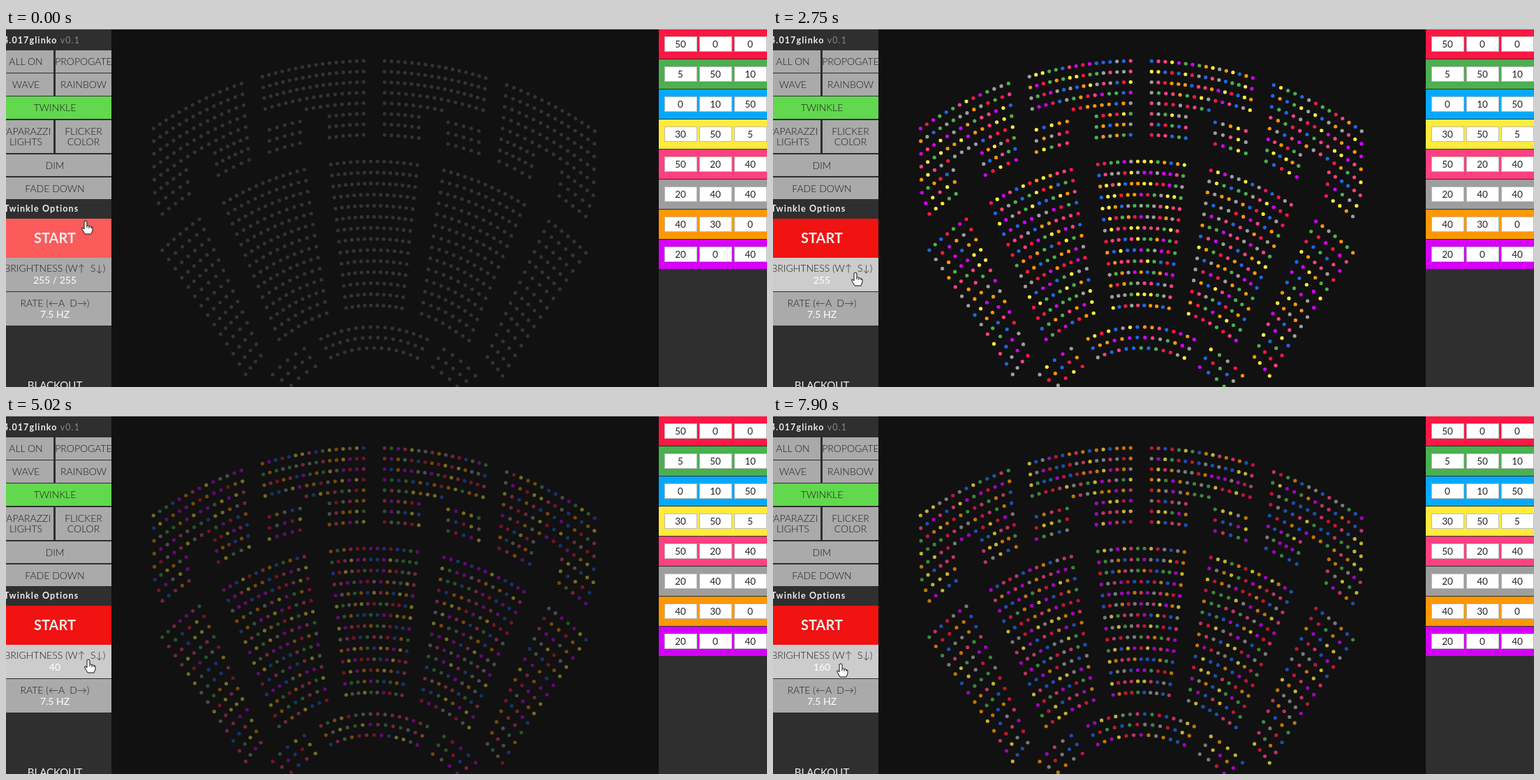
These frames come from a looping animation (1090x514 px, 8 s). An HTML page with a canvas:

```html
<!DOCTYPE html>
<html>
<head>
<meta charset="utf-8">
<style>
html, body { margin: 0; width: 100%; height: 100%; overflow: hidden; background: #2f2f2f; }
#stage { position: relative; width: 1090px; height: 514px; overflow: hidden; font: 300 14px/15px Lato, sans-serif; color: #1c1c1c; }
#stage > * { position: absolute; }
.box { display: flex; align-items: center; justify-content: center; text-align: center; white-space: pre; }
.tall { line-height: 16.5px; }
.tall span { color: #fff; font-weight: 400; }
.title { color: #eee; font-weight: 700; font-size: 12.5px; letter-spacing: 1.1px; justify-content: flex-start; }
.title span { color: #888; font-weight: 400; }
.start { font-size: 20px; font-weight: 700; color: #eee; }
.blackout { font-size: 15px; font-weight: 400; color: #eee; }
.field { box-sizing: border-box; border: 1px solid #bbb; font-weight: 400; font-size: 13.5px; color: #222; }
</style>
</head>
<body>
<div id="stage"><canvas id="seats" width="1090" height="514"></canvas></div>
<script>
const LOOP = 8000, LIGHTS_ON = 540, TICK = 133;
const stage = document.getElementById('stage');
const ctx = document.getElementById('seats').getContext('2d');
const mix = (a, b, k) => a + (b - a) * k;

function box(x, y, w, h, bg, html, cls = '') {
  const el = document.createElement('div');
  el.className = 'box ' + cls;
  el.style.cssText = `left:${x}px;top:${y}px;width:${w}px;height:${h}px;background:${bg}`;
  el.innerHTML = `<div>${html}</div>`;
  stage.append(el);
  return el;
}

// Left panel, running off the left edge
const GREY = '#aaa';
const wide = (y, h, html, cls, bg = GREY) => box(-11, y, 162, h, bg, html, cls);
const pair = (y, h, a, b) => { box(-11, y, 79, h, GREY, a); box(71, y, 80, h, GREY, b); };
box(-4, 8, 155, 18, 'none', '4.017glinko <span>v0.1</span>', 'title');
pair(32, 31.5, 'ALL ON', 'PROPOGATE');
pair(65, 31.5, 'WAVE', 'RAINBOW');
wide(98, 31.5, 'TWINKLE', '', '#62d84e');
pair(131.5, 47, 'PAPARAZZI\nLIGHTS', 'FLICKER\nCOLOR');
wide(180.5, 31.5, 'DIM');
wide(213.5, 31.5, 'FADE DOWN');
box(-3, 249, 154, 18, 'none', 'Twinkle Options', 'title');
const start = wide(273, 55.5, 'START', 'start');
const bright = wide(329, 47.5, 'BRIGHTNESS (W↑  S↓)\n<span></span>', 'tall');
const rate = wide(378, 48, 'RATE (←A  D→)\n<span>7.5 HZ</span>', 'tall');
wide(501, 20, 'BLACKOUT', 'blackout', 'none');
const level = bright.querySelector('span');

// Right panel
const swatches = {
  '#ff1744': '50 0 0', '#4caf50': '5 50 10', '#03a9ff': '0 10 50', '#ffeb3b': '30 50 5',
  '#ff4081': '50 20 40', '#9e9e9e': '20 40 40', '#ff9800': '40 30 0', '#d500f9': '20 0 40'
};
Object.entries(swatches).forEach(([color, rgb], i) => {
  const y = 2 + 43 * i;
  box(935, y, 155, 41.5, color, '');
  rgb.split(' ').forEach((v, k) => box(942.5 + 50 * k, y + 10, 47, 22, '#fff', v, 'field'));
});
box(0, 0, 1090, 1.5, '#c8c8c8', '');
const lamps = Object.keys(swatches).map(c => c === '#03a9ff' ? '#1f66e5' : c);

// Rows are arcs around one centre; a block lists its first row, row count and
// its distances from the axis: inner and outer, in its first and last row
const CENTER_X = 527.25, CENTER_Y = 602;
const seats = [];
function addSeat(radius, angle) {
  const r = radius + 16 * Math.max(0, Math.abs(angle) - 0.62);
  const dx = r * Math.sin(angle);
  seats.push([CENTER_X + dx, CENTER_Y - r * Math.cos(angle) + dx * 0.006]);
}
function tier(radius, gap, pitch, ...blocks) {
  for (const [first, rows, in0, out0, in1 = in0, out1 = out0] of blocks) {
    for (let r = 0; r < rows; r++) {
      const k = rows > 1 ? r / (rows - 1) : 0, R = radius - gap * (first + r);
      const a = Math.asin(mix(in0, in1, k) / R), b = Math.asin(mix(out0, out1, k) / R);
      const n = Math.round(R * (b - a) / (pitch + 1.9 * (a + b)));
      for (let i = 0; i <= n; i++) {
        const angle = mix(a, b, i / n);
        addSeat(R, angle);
        if (in0 > 0) addSeat(R, -angle);
      }
    }
  }
}
tier(555, 15.1, 9.3,
  [0, 4, 15, 160, 15, 156], [4, 1, 15, 97], [5, 3, 15, 64], [5, 3, 106, 150],
  [0, 5, 190, 316, 184, 314], [5, 3, 182, 228, 179, 223], [5, 3, 269, 313, 265, 302]);
tier(411, 15.85, 9.3,
  [0, 14, -62, 62, -40, 40], [0, 14, 100, 215, 68, 135], [0, 14, 250, 301, 159, 178]);
tier(174, 15, 10.8, [0, 3, -76, 76, -62, 62], [0, 3, 100, 141, 84, 115]);

// Pointers, with the tip at the origin
function pointer(d) {
  const el = document.createElement('div');
  el.innerHTML = `<svg width="24" height="26" viewBox="-8 -2 24 26" style="display:block;margin:-2px 0 0 -8px">
    <path d="${d}" fill="#fff" stroke="#111" stroke-linejoin="round"/></svg>`;
  stage.append(el);
  return el;
}
const hand = pointer('M-2 1Q0-1 2 1V7Q4 6 5 8Q7 7 8 9Q10 8 10 11V14L8 19H-1L-5 12Q-6 9-4 10L-2 12ZM2 7V10M5 8V11M8 9V11');
const arrow = pointer('M0 0V13L3 10L5 15L7 14L5 9.5H9Z');

function pointerAt(t) {
  let x = 114, y = 276;
  const glide = (from, to, toX, toY) => {
    const k = Math.min(1, Math.max(0, (t - from) / (to - from))), e = k * k * (3 - 2 * k);
    x = mix(x, toX, e);
    y = mix(y, toY, e);
  };
  glide(40, 360, 115, 283);
  glide(740, 1420, 500, 233);
  glide(1640, 2360, 118, 350);
  glide(5700, 6660, 104, 384);
  glide(6720, 7000, 97, 356);
  return [x, y];
}

function brightness(t) {
  if (t < 4070) return 255;
  if (t < 7140) return Math.max(20, 240 - 20 * Math.floor((t - 4070) / 94));
  return Math.min(160, 40 + 20 * Math.floor((t - 7140) / 125));
}

function lampFor(seat, tick) {
  const h = Math.sin(seat * 12.9898 + tick * 78.233) * 43758.5453;
  return lamps[Math.floor((h - Math.floor(h)) * lamps.length)];
}

function draw() {
  const t = performance.now() % LOOP;
  const lit = t >= LIGHTS_ON, tick = Math.floor((t - LIGHTS_ON) / TICK), value = brightness(t);

  ctx.globalAlpha = 1;
  ctx.fillStyle = '#111';
  ctx.fillRect(151, 0, 784, 514);
  ctx.globalAlpha = lit ? 0.3 + 0.7 * value / 255 : 1;
  seats.forEach(([x, y], i) => {
    ctx.fillStyle = lit ? lampFor(i + 1, tick) : '#333';
    ctx.beginPath();
    ctx.arc(x, y, 2.6, 0, 7);
    ctx.fill();
  });

  const [x, y] = pointerAt(t), inPanel = x < 151;
  const over = (top, bottom) => inPanel && y >= top && y < bottom;
  start.style.background = over(273, 328) ? '#fb5b5b' : '#f11212';
  bright.style.background = over(328, 377) ? '#ccc' : GREY;
  rate.style.background = over(377, 426) ? '#ccc' : GREY;
  level.textContent = t < 300 ? '255 / 255' : value;
  for (const el of [hand, arrow]) {
    el.style.left = x + 'px';
    el.style.top = y + 'px';
    el.style.display = (el === hand) === inPanel ? 'block' : 'none';
  }
  requestAnimationFrame(draw);
}
draw();
</script>
</body>
</html>
```
